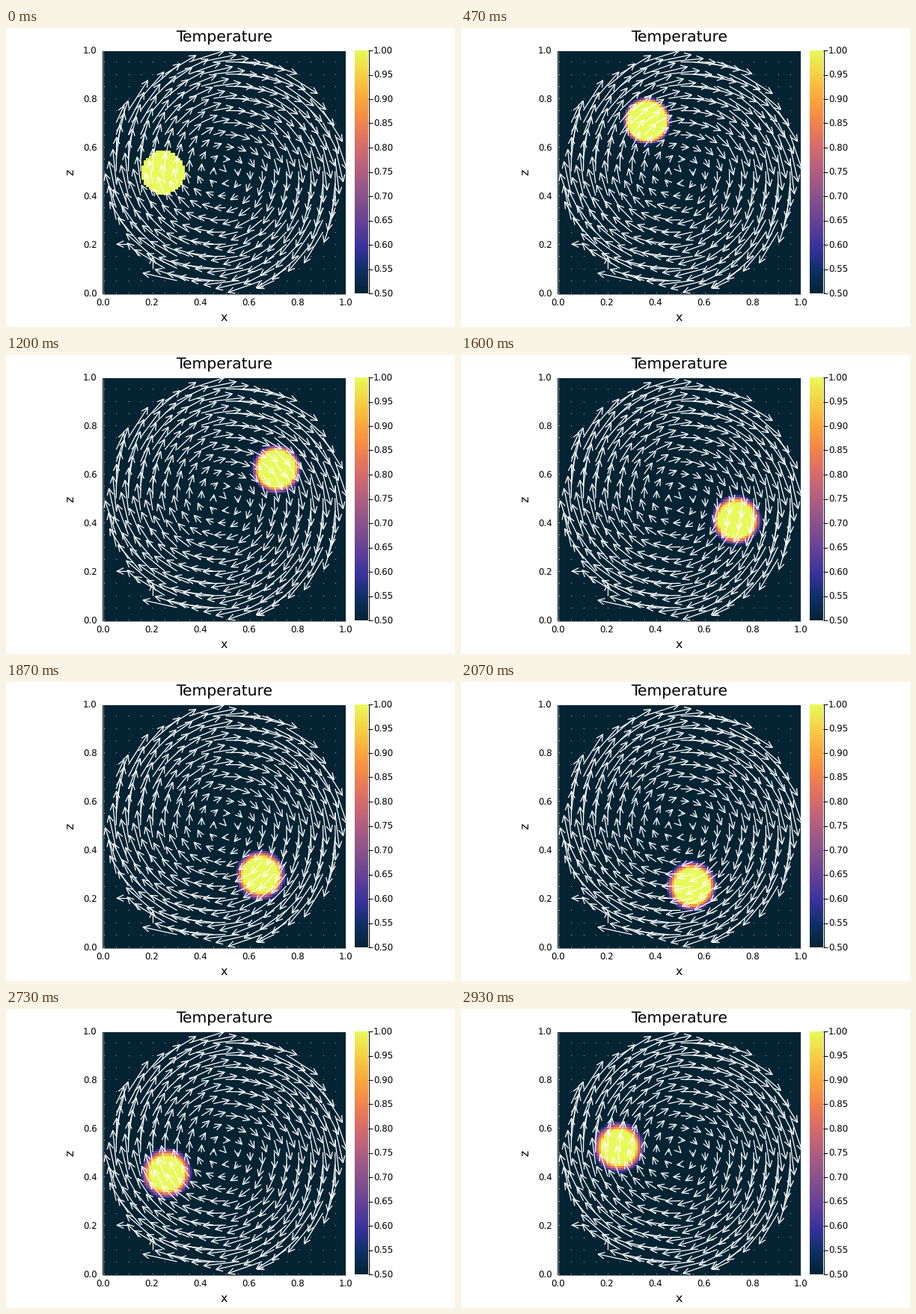
A matplotlib script for the animation above (2.99 s loop, 600 by 400 pixels).

```python
import numpy as np
import matplotlib.pyplot as plt
from matplotlib.animation import FuncAnimation
from matplotlib.collections import LineCollection
from matplotlib.colors import LinearSegmentedColormap
from matplotlib.patches import Rectangle

W, H, DPI = 600, 400, 100
FRAMES, LOOP = 45, 2990
LEFT, TOP, SIDE = 129.4, 30.75, 325
RIGHT, BOTTOM = LEFT + SIDE, TOP + SIDE
BAR_TOP, BAR_BOTTOM = 30, 355
N = 100                              # grid cells per side
DX = 1 / N
TURN = np.radians(8.32)              # rotation per frame
MASK = 0.49                          # radius of the rotating region
ARROW = np.pi / 10                   # arrow length per unit velocity
HEAD, SPREAD = 9.8, np.radians(26)

thermal = LinearSegmentedColormap.from_list("thermal", [
    "#042333", "#0d3064", "#35329b", "#5d3e99", "#7e4d8f", "#9e5987",
    "#c16479", "#e17161", "#f68b45", "#fbad3c", "#f6d346", "#e7fa5a"], N=256)

plt.rcParams["font.family"] = "DejaVu Sans"
plt.rcParams["text.hinting"] = "none"
fig = plt.figure(figsize=(W / DPI, H / DPI), dpi=DPI, facecolor="white")
ax = fig.add_axes([0, 0, 1, 1])


def px(size):
    return size * 72 / DPI


def to_px(x, z):
    return LEFT + SIDE * x, BOTTOM - SIDE * z


def label(x, y, text, size, **kw):
    kw = {"ha": "center", "va": "baseline", **kw}
    ax.text(x, y, text, fontsize=px(size), color="black", **kw)


def line(xs, ys, color="black"):
    ax.plot(xs, ys, color=color, lw=px(1), zorder=2, solid_capstyle="butt")


def inside(x, z):
    return np.hypot(x - 0.5, z - 0.5) < MASK


def velocity(x, z):
    """Clockwise rotation on cell faces, averaged to the cell centre."""
    h = DX / 2
    vx = (z - 0.5) * (inside(x - h, z) * 0.5 + inside(x + h, z) * 0.5)
    vz = (0.5 - x) * (inside(x, z - h) * 0.5 + inside(x, z + h) * 0.5)
    return vx, vz


def draw_arrows(clip):
    lines, dots = [], []
    nodes = np.arange(0, N, 5) * DX + DX / 2
    for x in nodes:
        for z in nodes:
            vx, vz = velocity(x, z)
            start = np.array(to_px(x, z))
            if vx == 0 and vz == 0:
                dots.append(start)
                continue
            step = ARROW * SIDE * np.array([vx, -vz])
            tip = start + step
            back = np.arctan2(-step[1], -step[0])
            barbs = [tip + HEAD * np.array([np.cos(a), np.sin(a)])
                     for a in (back - SPREAD, back + SPREAD)]
            lines.append([start, tip])
            lines.append([barbs[0], tip, barbs[1]])
    arrows = LineCollection(lines, colors="white", linewidths=px(1.25),
                            zorder=3)
    ax.add_collection(arrows)
    arrows.set_clip_path(clip)
    ax.scatter(*np.transpose(dots), s=px(1.1) ** 2, c="white", alpha=0.75,
               linewidths=0, zorder=3)


cells = (np.arange(N) + 0.5) * DX
gx, gz = np.meshgrid(cells, cells[::-1])


def temperature(k):
    a = k * TURN
    d = np.hypot(gx - 0.5 + 0.25 * np.cos(a), gz - 0.5 - 0.25 * np.sin(a))
    half = max(0.019 * (k / (FRAMES - 1)) ** 0.3, 1e-6)
    return 0.5 + 0.5 * np.clip((0.09 - d) / (2 * half) + 0.5, 0, 1)


field = ax.imshow(temperature(0), cmap=thermal, vmin=0.5, vmax=1,
                  extent=(LEFT, RIGHT, BOTTOM, TOP),
                  interpolation="nearest", zorder=1)
ax.imshow(np.linspace(1, 0.5, 256)[:, None], cmap=thermal, vmin=0.5, vmax=1,
          extent=(466, 484, BAR_BOTTOM, BAR_TOP), interpolation="nearest",
          zorder=1)
ax.set(xlim=(0, W), ylim=(H, 0), aspect="auto")
ax.axis("off")

frame = Rectangle((LEFT, TOP), SIDE + 1, SIDE, transform=ax.transData)
draw_arrows(frame)

line([129.5, 129.5, RIGHT], [TOP, 355.5, 355.5], "#808080")
for v in np.linspace(0, 1, 6):
    x, y = to_px(v, v)
    label(x, 371.5, f"{v:.1f}", 11.7)
    label(121.5, y + 4.4, f"{v:.1f}", 11.7, ha="right")

line([484.5, 484.5], [BAR_TOP, BAR_BOTTOM])
for v in np.linspace(0.5, 1, 11):
    y = BAR_BOTTOM - (BAR_BOTTOM - BAR_TOP) * (v - 0.5) * 2
    line([484, 490], [y, y])
    label(491, y + 4.5, f"{v:.2f}", 11.7, ha="left")

label(292, 18, "Temperature", 20.4)
label(291.5, 391.5, "x", 15.9)
label(86, 193, "z", 15.9, rotation=90, va="center")


def update(k):
    field.set_data(temperature(k))
    return field,


anim = FuncAnimation(fig, update, frames=FRAMES, interval=LOOP / FRAMES,
                     repeat=True, repeat_delay=0, blit=False)
plt.show()
```
